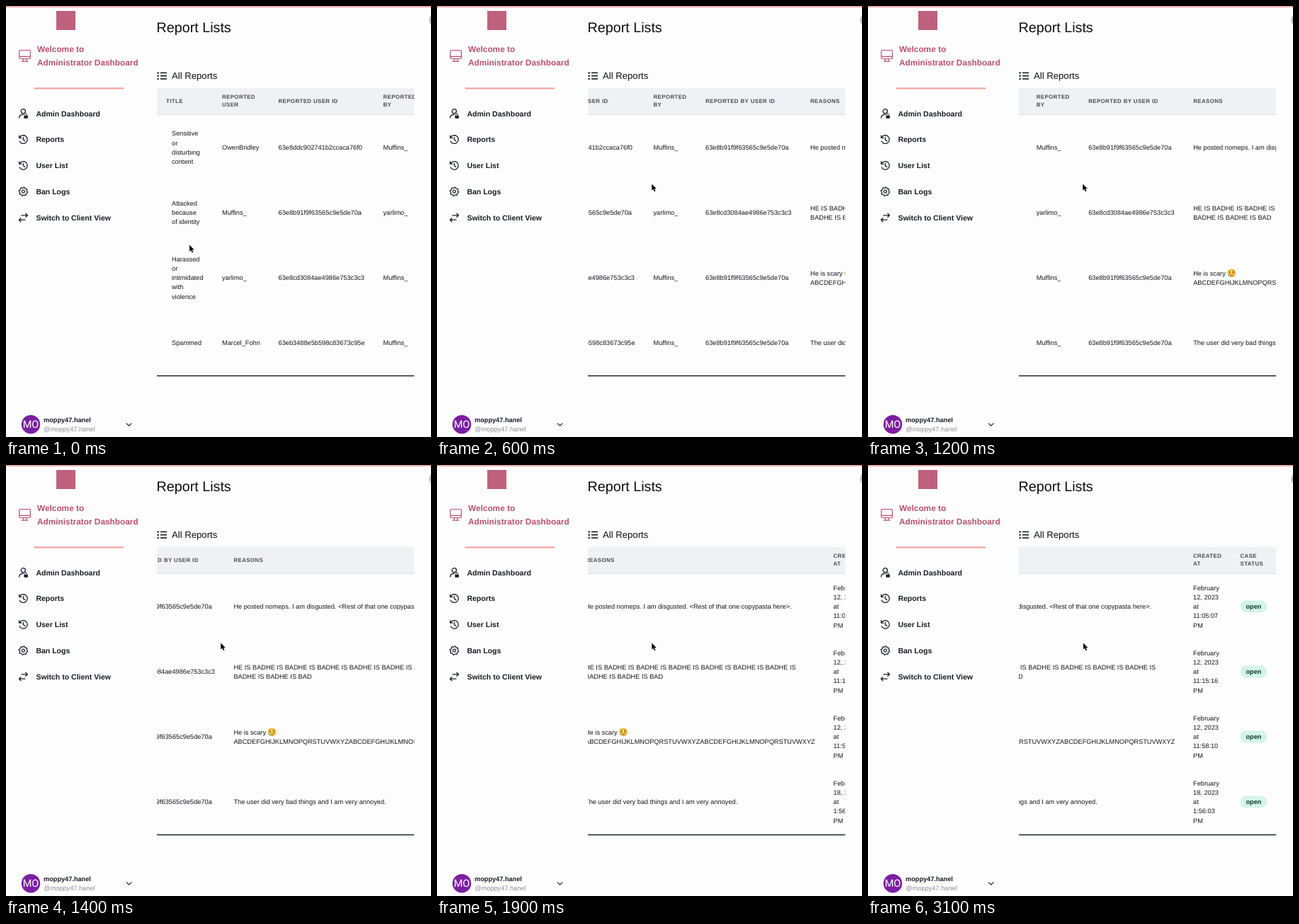
Animation, 600 px wide and 609 px high, one loop 3200 ms. Source, as an HTML page with a canvas:

```html
<!DOCTYPE html>
<html lang="en">
<head>
<meta charset="utf-8">
<title>Report Lists</title>
<style>
  html, body { margin: 0; width: 100%; height: 100%; overflow: hidden; background: #fefdfe; }
  canvas { display: block; width: 600px; height: 609px; }
</style>
</head>
<body>
<canvas id="stage"></canvas>
<script>
const W = 600, H = 609, LOOP = 3200, STEP = 100;
const SANS = '"Liberation Sans", Arial, sans-serif';
const INK = '#171c26', ROSE = '#b5526e', CORAL = '#f2a3a0';
const canvas = document.getElementById('stage');
const ratio = window.devicePixelRatio || 1;
canvas.width = W * ratio;
canvas.height = H * ratio;
const ctx = canvas.getContext('2d');
ctx.scale(ratio, ratio);
ctx.textRendering = 'geometricPrecision';

// [ms, px]: three trackpad swipes with inertia
const swipes = [
  [300, 0], [400, 52], [500, 150], [600, 227], [700, 262], [800, 278],
  [900, 285], [1000, 288], [1100, 290], [1200, 294.8], [1300, 362],
  [1400, 432.6], [1500, 480], [1600, 506], [1700, 518.5], [1800, 523],
  [1900, 545], [2000, 585], [2100, 622], [2200, 640], [2300, 645.5]
];

const columns = [
  [226, 'TITLE'], [305, 'REPORTED|USER'], [384.5, 'REPORTED USER ID'],
  [532.5, 'REPORTED|BY'], [606, 'REPORTED BY USER ID'], [754, 'REASONS'],
  [1104.5, 'CREATED|AT'], [1171, 'CASE|STATUS']
];
const cellX = [234, 305, 384.5, 532.5, 606, 754, 1104.5];
const idA = '63e8b91f9f63565c9e5de70a', idB = '63e8cd3084ae4986e753c3c3';
const alphabet = 'ABCDEFGHIJKLMNOPQRSTUVWXYZ';
const bad = n => 'HE IS ' + Array(n).fill('BADHE IS').join(' ');
const rows = [
  ['Sensitive|or|disturbing|content', 'OwenBridley', '63e8ddc902741b2ccaca76f0',
    'Muffins_', idA, 'He posted nomeps. I am disgusted. <Rest of that one copypasta here>.',
    'February|12, 2023|at|11:05:07|PM'],
  ['Attacked|because|of identity', 'Muffins_', idA, 'yarlimo_', idB,
    bad(6) + '|BADHE IS BADHE IS BAD', 'February|12, 2023|at|11:15:16|PM'],
  ['Harassed|or|intimidated|with|violence', 'yarlimo_', idB, 'Muffins_', idA,
    'He is scary|' + alphabet + alphabet, 'February|12, 2023|at|11:58:10|PM'],
  ['Spammed', 'Marcel_Fohn', '63eb3488e5b598c83673c95e', 'Muffins_', idA,
    'The user did very bad things and I am very annoyed.', 'February|18, 2023|at|1:56:03|PM']
];

function text(str, x, y, size, color = INK, weight = 400, family = SANS) {
  ctx.font = `${weight} ${size}px ${family}`;
  ctx.fillStyle = color;
  ctx.fillText(str, x, y);
}

function lines(str, x, mid, lead, draw) {
  const parts = str.split('|');
  parts.forEach((s, i) => draw(s, x, mid + (i - (parts.length - 1) / 2) * lead));
}

function rect(x, y, w, h, color) {
  ctx.fillStyle = color;
  ctx.fillRect(x, y, w, h);
}

function disc(x, y, r, color) {
  ctx.fillStyle = color;
  ctx.beginPath();
  ctx.arc(x, y, r, 0, Math.PI * 2);
  ctx.fill();
}

function stroke(d, x, y, color = INK, width = 1.3) {
  ctx.save();
  ctx.translate(x, y);
  ctx.strokeStyle = color;
  ctx.lineWidth = width;
  ctx.lineCap = ctx.lineJoin = 'round';
  ctx.stroke(new Path2D(d));
  ctx.restore();
}

function fill(d, x, y, color = INK) {
  ctx.save();
  ctx.translate(x, y);
  ctx.fillStyle = color;
  ctx.fill(new Path2D(d));
  ctx.restore();
}

function clockIcon(x, y) {
  stroke('M-5.3-2.4A5.8 5.8 0 1 1-5.2 2.6M-5.8-5.4V-2.2H-2.6M0-3V.4L2.4 2', x, y);
}

function userIcon(x, y) {
  stroke('M-3.2-3a3.1 3.1 0 1 0 6.2 0a3.1 3.1 0 1 0-6.2 0M-5.8 6.3C-5.8 2.8-3.2 1.4 0 1.6', x, y);
  fill('M1 3.2h5.4v3.8H1z', x, y);
  stroke('M2.3 3V1.9a1.4 1.4 0 0 1 2.8 0V3', x, y, INK, 1);
}

function gearIcon(x, y) {
  let d = '';
  for (let i = 0; i < 32; i++) {
    const a = (i + 0.5) / 32 * Math.PI * 2;
    const r = i % 4 < 2 ? 6.2 : 5;
    d += `${i ? 'L' : 'M'}${r * Math.cos(a)} ${r * Math.sin(a)}`;
  }
  stroke(d + 'ZM-2 0a2 2 0 1 0 4 0a2 2 0 1 0-4 0', x, y, INK, 1.2);
}

function swapIcon(x, y) {
  stroke('M-2.5-3.2H6M3.4-5.8L6-3.2L3.4-.6M2.5 3.2H-6M-3.4.6L-6 3.2L-3.4 5.8', x, y);
}

function sidebar() {
  rect(71, 7, 27, 27, '#bd617c');
  stroke('M-6.6-7.8H6.6Q7.8-7.8 7.8-6.6V3Q7.8 4.2 6.6 4.2H-6.6Q-7.8 4.2-7.8 3V-6.6Q-7.8-7.8-6.6-7.8ZM-7.8 1H7.8M-2 4.2L-2.7 7.7M2 4.2L2.7 7.7M-4.4 7.8H4.4',
    26.6, 70.3, ROSE, 1.2);
  text('Welcome to', 44, 65.4, 11.83, ROSE, 700);
  text('Administrator Dashboard', 44, 83.6, 11.83, ROSE, 700);
  rect(39.5, 115.3, 126.5, 2.2, CORAL);

  const menu = [
    ['Admin Dashboard', userIcon], ['Reports', clockIcon], ['User List', clockIcon],
    ['Ban Logs', gearIcon], ['Switch to Client View', swapIcon]
  ];
  menu.forEach(([label, icon], i) => {
    const y = 151.8 + i * 36.8;
    icon(24.4, y);
    text(label, 42.4, y + 3.7, 10.52, INK, 700);
  });

  disc(35, 591.2, 13.2, '#7b1fa2');
  ctx.textAlign = 'center';
  text('MO', 35, 596.4, 14.5, '#fff', 400, 'Roboto, sans-serif');
  ctx.textAlign = 'left';
  text('moppy47.hanel', 53, 588, 9.2, INK, 700);
  text('@moppy47.hanel', 53.3, 601, 9.2, '#8b8e96');
  stroke('M-3.4-1.7L0 1.7L3.4-1.7', 173.6, 591.5, INK, 1.2);
}

function emoji(x, y) {
  const g = ctx.createRadialGradient(x - 1, y - 2, 1, x, y, 6);
  g.addColorStop(0, '#ffe45c');
  g.addColorStop(1, '#f0a92c');
  disc(x, y, 5.9, g);
  disc(x - 2.2, y - 0.4, 0.9, '#5b3a12');
  disc(x + 2.2, y - 0.4, 0.9, '#5b3a12');
  stroke('M-3.6-2.4L-1.6-3.2M3.6-2.4L1.6-3.2M-1.8 3.5Q0 1.8 1.8 3.5', x, y, '#6b4415', 0.8);
  fill('M0-1.8C2 .8 1.2 2 0 2S-2 .8 0-1.8', x - 3.4, y + 3, '#8fc6ea');
}

function table(scroll) {
  ctx.save();
  ctx.beginPath();
  ctx.rect(213, 115, 363.3, 410);
  ctx.clip();
  rect(213, 116, 364, 37, '#eff1f4');
  rect(213, 152.8, 364, 1, '#d9dce1');
  rect(213, 521.8, 364, 1.5, '#1d2426');
  ctx.translate(-scroll, 0);

  ctx.letterSpacing = '0.394px';
  for (const [x, label] of columns)
    lines(label, x, 136.6, 10.6, (s, px, py) => text(s, px, py, 7.89, '#474b54', 700));
  ctx.letterSpacing = '0px';

  rows.forEach((row, i) => {
    const mid = 200 + i * 92;
    row.forEach((cell, c) =>
      lines(cell, cellX[c], mid + 3.2, 13.15, (s, px, py) => text(s, px, py, 9.23, '#14171d')));
    ctx.fillStyle = '#d3f4e6';
    ctx.beginPath();
    ctx.roundRect(1171.2, mid - 8.6, 37.6, 17.1, 8.5);
    ctx.fill();
    text('open', 1179, mid + 2.8, 9.2, '#0d3b2e', 700);
  });
  emoji(808, 377.4);
  ctx.restore();
}

function cursor(x, y) {
  const d = 'M0 0V9.4L2.1 7.4L3.6 10.9L5.3 10.2L3.8 6.8H6.7Z';
  stroke(d, x, y, '#fff', 1.6);
  fill(d, x, y, '#0b0b0d');
}

function scrollAt(t) {
  const i = swipes.findIndex(k => k[0] > t);
  if (i === 0) return 0;
  if (i < 0) return swipes[swipes.length - 1][1];
  const [t0, p0] = swipes[i - 1], [t1, p1] = swipes[i];
  return p0 + (p1 - p0) * (t - t0) / (t1 - t0);
}

function draw(t) {
  rect(0, 0, W, H, '#fefdfe');
  rect(0, 0, W, 2, '#f1a9a8');
  disc(606, 19.5, 9, '#c3c3c6');
  sidebar();
  text('Report Lists', 212.6, 37, 19.72, '#0c0d10');
  for (let i = 0; i < 3; i++) {
    const y = 94.4 + i * 4.3;
    disc(214.6, y, 1.25, INK);
    rect(218, y - 0.8, 9, 1.6, INK);
  }
  text('All Reports', 234, 102.8, 13.15, '#0c0d10');
  table(scrollAt(t));
  if (t < 100) cursor(259, 337.6);
  else cursor(t < 2200 ? 303.2 : 303.9, 251.4);
}

const start = performance.now();
function tick() {
  const t = (performance.now() - start) % LOOP;
  draw(Math.floor(t / STEP) * STEP);
  requestAnimationFrame(tick);
}
tick();
</script>
</body>
</html>
```
